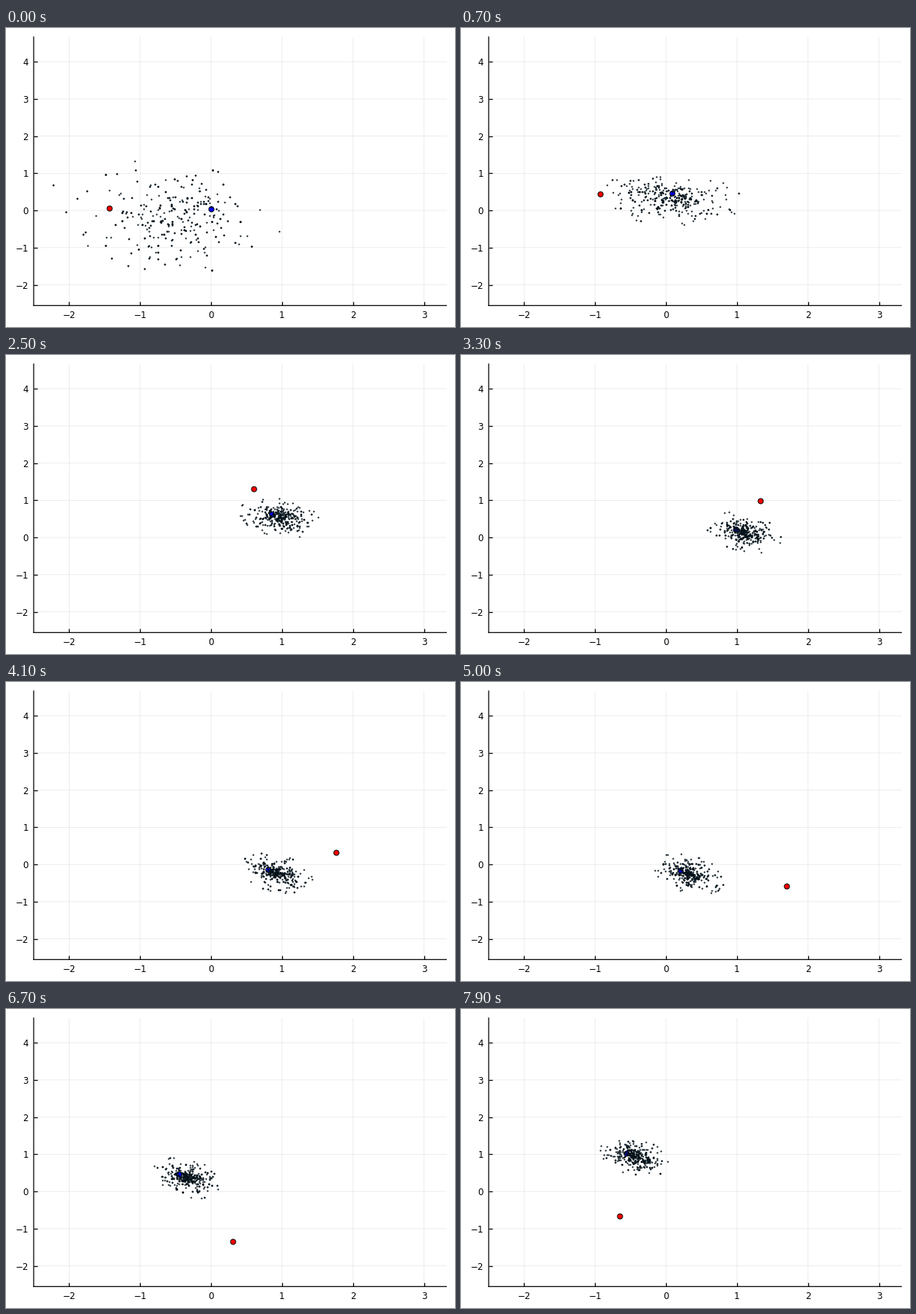
Animation, 600 px wide and 400 px high, one loop 8 s. Source, as a matplotlib script:

```python
import numpy as np
import matplotlib.pyplot as plt
from matplotlib.animation import FuncAnimation

W, H, DPI = 600, 400, 100
FRAMES, STEP_MS = 80, 100
N, DISTINCT = 450, 240
PX = 72 / DPI  # points per pixel

# Plot box, data origin and unit lengths in pixels
LEFT, RIGHT, TOP, BOTTOM = 37, 588.5, 12, 371.3
X0, Y0, KX, KY = 274, 244.1, 94.87, 49.74

T = np.arange(FRAMES)


def fade(t, tau):
    return np.exp(-t / tau)


def red_path(t):
    """Steady circling that the first steps settle into."""
    a = 0.0766 * (t - 44.5)
    e = fade(t, 5)
    return np.column_stack([0.5 + 1.31 * np.cos(a) - 0.67 * e,
                            -0.03 - 1.33 * np.sin(a) + 0.45 * e])


def smooth_path(t, keys, pts):
    """Cubic Hermite curve through a few key points."""
    keys, pts = np.array(keys, float), np.array(pts)
    slope = np.gradient(pts, keys, axis=0)
    i = np.clip(np.searchsorted(keys, t, side="right") - 1, 0, len(keys) - 2)
    h = (keys[i + 1] - keys[i])[:, None]
    s = (t - keys[i])[:, None] / h
    ease = s * s * (3 - 2 * s)
    return ((1 - ease) * pts[i] + ease * pts[i + 1]
            + h * s * (1 - s) * ((1 - s) * slope[i] - s * slope[i + 1]))


red = red_path(T)
blue = smooth_path(T, [0, 14, 25, 41, 50, 67, 79],
                   [(0, 0.05), (0.24, 0.75), (0.85, 0.63), (0.80, -0.14),
                    (0.20, -0.16), (-0.45, 0.46), (-0.56, 1.03)])


def resample(u, rng):
    u = u + rng.normal(0, 0.35, u.shape)
    w = np.exp(-(u**2).sum(axis=1) / 10)
    u = u[rng.choice(N, N, p=w / w.sum())]
    u = (u - u.mean(axis=0)) / u.std(axis=0)
    r = np.hypot(*u.T)[:, None]
    return u * np.minimum(1, 2.7 / r)


def place(u, t):
    """Cloud beside the blue dot: wide at first, then tight and tilted."""
    settle = 1 - fade(t, 8)
    r = np.hypot(*u.T)[:, None]
    x, y = (u * r ** (0.3 * settle) * (1 - 0.1 * settle)).T
    tilt = -0.35 * (1 - fade(t, 15))
    y = tilt * x + np.sqrt(1 - tilt**2) * y
    cx, cy = blue[t] + (0.12, -0.09) - np.array([0.65, 0.18]) * fade(t, 5)
    sx = 0.15 + 0.42 * fade(t, 9)
    sy = 0.165 + 0.4 * fade(t, 4)
    return np.column_stack([cx + sx * x, cy + sy * y])


def simulate(seed=12):
    rng = np.random.default_rng(seed)
    u = rng.normal(size=(DISTINCT, 2))
    u = u[np.r_[:DISTINCT, rng.integers(0, DISTINCT, N - DISTINCT)]]
    clouds = [place(u, 0)]
    for t in T[1:]:
        u = resample(u, rng)
        clouds.append(place(u, t))
    return clouds


clouds = simulate()

plt.rcParams.update({"font.family": "DejaVu Sans", "path.snap": False})
fig = plt.figure(figsize=(W / DPI, H / DPI), dpi=DPI, facecolor="white")
ax = fig.add_axes([LEFT / W, 1 - BOTTOM / H, (RIGHT - LEFT) / W, (BOTTOM - TOP) / H])
ax.set_xlim((LEFT - X0) / KX, (RIGHT - X0) / KX)
ax.set_ylim((Y0 - BOTTOM) / KY, (Y0 - TOP) / KY)
ax.set_xticks(range(-2, 4))
ax.set_yticks(range(-2, 5))
ax.set_axisbelow(True)
ax.grid(color="black", alpha=0.1, linewidth=0.7 * PX)
ax.tick_params(direction="in", length=5 * PX, width=1.25 * PX, pad=7 * PX, labelsize=8.6)
for side, spine in ax.spines.items():
    spine.set_linewidth(1.25 * PX)
    spine.set_visible(side in ("left", "bottom"))


def marker(color, z):
    return ax.scatter([0], [0], s=(7 * PX) ** 2, c=color, edgecolors="black",
                      linewidths=PX, zorder=z)


blue_dot = marker("#0000ff", 3)
red_dot = marker("#ff0000", 4)
dots = ax.scatter([], [], s=(2.2 * PX) ** 2, c="#04121a", linewidths=0, zorder=5)


def draw(i):
    blue_dot.set_offsets(blue[i])
    red_dot.set_offsets(red[i])
    dots.set_offsets(clouds[i])
    return blue_dot, red_dot, dots


anim = FuncAnimation(fig, draw, frames=FRAMES, interval=STEP_MS, repeat=True,
                     repeat_delay=0, blit=False)
plt.show()
```
